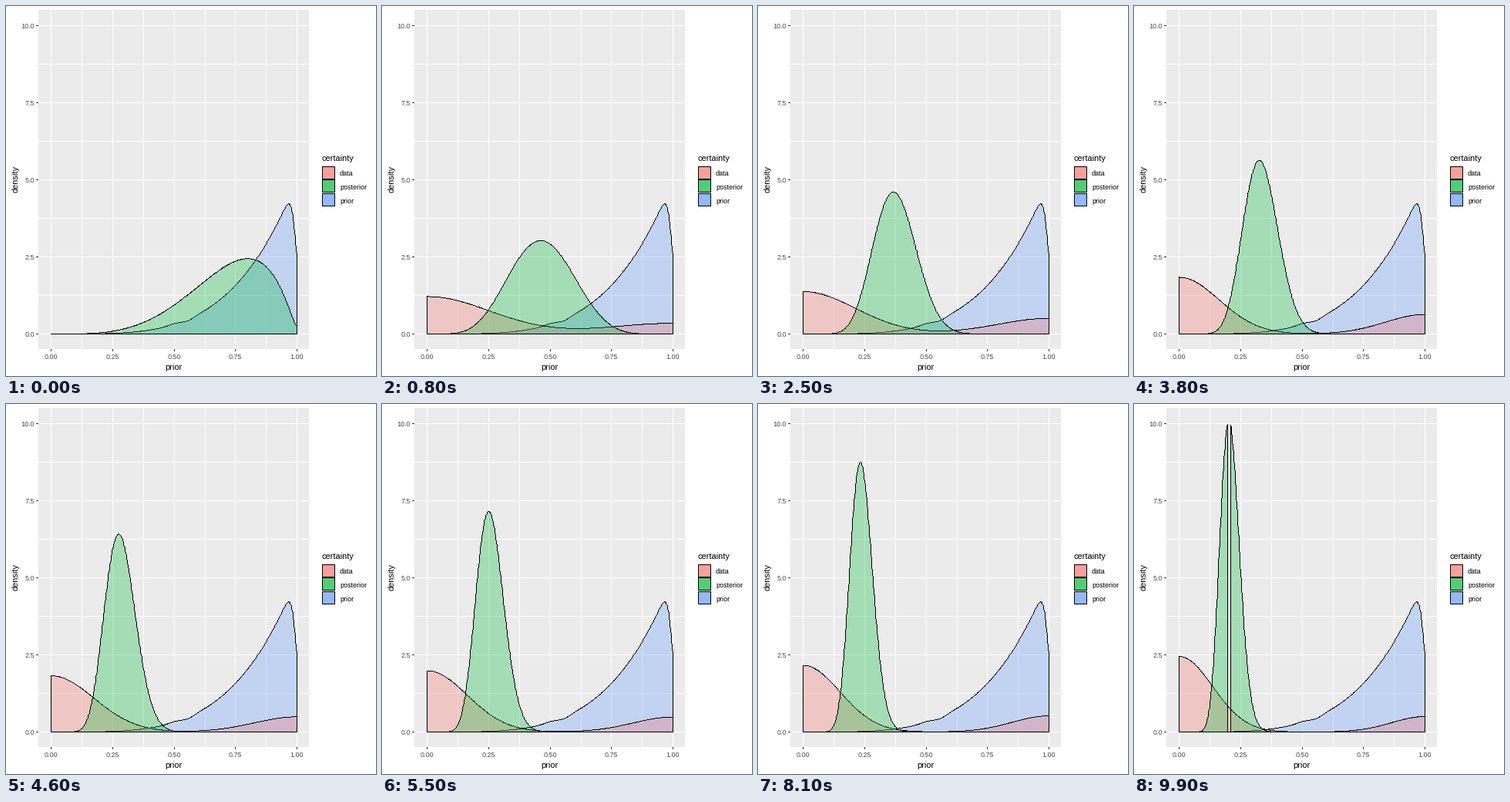
These frames come from a looping animation (480x480 px, 10 s). A matplotlib script:

```python
import math

import matplotlib.pyplot as plt
import numpy as np
from matplotlib.animation import FuncAnimation
from matplotlib.colors import to_rgba
from matplotlib.patches import PathPatch, Polygon, Rectangle
from matplotlib.path import Path

plt.rcParams["font.family"] = "Liberation Sans"

SIZE = 480
TRIALS = 100
DRAWS = 10000
Y_MAX = 10
ALPHA = 0.3
RED, GREEN, BLUE = "#F8766D", "#00BA38", "#619CFF"
GREY = "#4D4D4D"

# Trials that ended in a success; all the others failed.
HITS = [4, 8, 11, 15, 18, 22, 25, 31, 36, 38, 50, 60, 65, 70, 74, 78, 90]
outcomes = np.zeros(TRIALS)
outcomes[np.array(HITS) - 1] = 1

grid = np.linspace(0, 1, 512)
nodes = (np.arange(1000) + 0.5) / 1000


def px(x):
    return np.rint(58.2 + 319 * np.asarray(x)).astype(int)


def py(y):
    return np.rint(425 - 40 * np.asarray(y)).astype(int)


def kernel(points, bw):
    z = (grid[:, None] - points[None, :]) / bw
    return np.exp(-z * z / 2) / (bw * math.sqrt(2 * math.pi))


def beta_density(a, b):
    """Beta curve as a kernel estimate from many draws would show it."""
    log_norm = math.lgamma(a + b) - math.lgamma(a) - math.lgamma(b)
    pdf = np.exp(log_norm + (a - 1) * np.log(nodes) + (b - 1) * np.log(1 - nodes))
    sd = math.sqrt(a * b / (a + b + 1)) / (a + b)
    return kernel(nodes, 0.8 * sd * DRAWS ** -0.2) @ pdf / len(nodes)


def data_density(values):
    """Kernel estimate with the rule-of-thumb bandwidth."""
    n = len(values)
    sd = values.std(ddof=1)
    q1, q3 = np.percentile(values, [25, 75])
    spread = min(sd, (q3 - q1) / 1.34) or sd or 1
    return kernel(values, 0.9 * spread * n ** -0.2).mean(axis=1)


def prior_density():
    wobble = (0.025 * np.exp(-((grid - 0.495) / 0.025) ** 2)
              - 0.05 * np.exp(-((grid - 0.56) / 0.03) ** 2))
    return beta_density(5, 1) + wobble


fig = plt.figure(figsize=(SIZE / 72, SIZE / 72), dpi=72, facecolor="white")
ax = fig.add_axes([0, 0, 1, 1])
ax.set_xlim(0, SIZE)
ax.set_ylim(SIZE, 0)
ax.axis("off")


def rect(x, y, w, h, color):
    ax.add_patch(Rectangle((x, y), w, h, fc=color, lw=0, snap=False))


def label(x, y, text, size=9, color="black", ha="left", **kw):
    ax.text(x, y, text, fontsize=size, color=color, ha=ha, va="baseline", **kw)


def draw_panel():
    left, right, top, bottom = 42, 393, 5, 445
    rect(left, top, right - left, bottom - top, "#EBEBEB")
    for i in range(9):
        x, y = px(i / 8), py(i * 1.25)
        rect(x, top, 1, bottom - top, "white")
        rect(left, y, right - left, 1, "white")
        if i % 2 == 0:
            rect(x, bottom, 1, 3, "#333333")
            rect(left - 3, y, 3, 1, "#333333")
            label(x + 0.5, 458, f"{i / 8:.2f}", color=GREY, ha="center")
            label(37, y + 4, f"{i * 1.25:.1f}", color=GREY, ha="right")
    label(217.5, 472, "prior", 11, ha="center")
    label(15.5, 225, "density", 11, ha="center", rotation=90,
          rotation_mode="anchor")


def draw_legend():
    label(410, 201, "certainty", 11)
    depth = 1 - (1 - ALPHA) ** 3
    rect(410, 208, 17, 52, "#F2F2F2")
    for name, color, y in [("data", RED, 208), ("posterior", GREEN, 225),
                           ("prior", BLUE, 243)]:
        rect(410, y, 17, 17, "black")
        rect(411, y + 1, 15, 15, "#F2F2F2")
        rect(411, y + 1, 15, 15, to_rgba(color, depth))
        label(433, y + 12.5, name)


def pixel_path(points):
    """One small square for every pixel along a closed outline."""
    cells = [np.linspace(p, q, abs(q - p).max() + 1)
             for p, q in zip(points, np.roll(points, -1, axis=0))]
    cells = np.unique(np.rint(np.concatenate(cells)), axis=0)
    square = np.array([[1, 1], [3, 1], [3, 3], [1, 3], [1, 1]]) / 4
    verts = (cells[:, None, :] + square).reshape(-1, 2)
    codes = [Path.MOVETO] + [Path.LINETO] * 3 + [Path.CLOSEPOLY]
    return Path(verts, np.tile(codes, len(cells)))


class Area:
    """Translucent area with a crisp outline one pixel wide."""

    def __init__(self, color, z):
        start = np.zeros((3, 2))
        self.fill = ax.add_patch(Polygon(start, fc=to_rgba(color, ALPHA), lw=0,
                                         snap=False, zorder=z))
        self.edge = ax.add_patch(PathPatch(Path(start), fc="black", lw=0, snap=False,
                                           antialiased=False, zorder=z + 0.5))

    def set(self, xs, ys):
        shown = len(xs) > 1
        self.fill.set_visible(shown)
        self.edge.set_visible(shown)
        if not shown:
            return
        x = px(np.r_[xs[0], xs, xs[-1]])
        y = py(np.r_[0, ys, 0])
        points = np.column_stack([x, y])
        moved = np.r_[True, np.any(np.diff(points, axis=0) != 0, axis=1)]
        points = points[moved]
        self.fill.set_xy(points + 0.5)
        self.edge.set_path(pixel_path(points))


draw_panel()
draw_legend()
prior = Area(BLUE, 3)
data = Area(RED, 4)
posterior = [Area(GREEN, 5), Area(GREEN, 5)]
prior.set(grid, prior_density())


def update(i):
    seen = outcomes[:i + 1]
    n, hits = len(seen), int(seen.sum())
    if n > 1:
        data.set(grid, data_density(seen))
    else:
        data.set([], [])

    # Values above the axis limit drop out and split the area in two.
    dens = beta_density(5 + hits, 1 + n - hits)
    over = np.flatnonzero(dens > Y_MAX)
    first, last = (over[0], over[-1] + 1) if len(over) else (len(grid), len(grid))
    posterior[0].set(grid[:first], dens[:first])
    posterior[1].set(grid[last:], dens[last:])
    return []


def init():
    return update(0)


anim = FuncAnimation(fig, update, frames=TRIALS, init_func=init,
                     interval=100, repeat=True, repeat_delay=0, blit=False)
plt.show()
```
